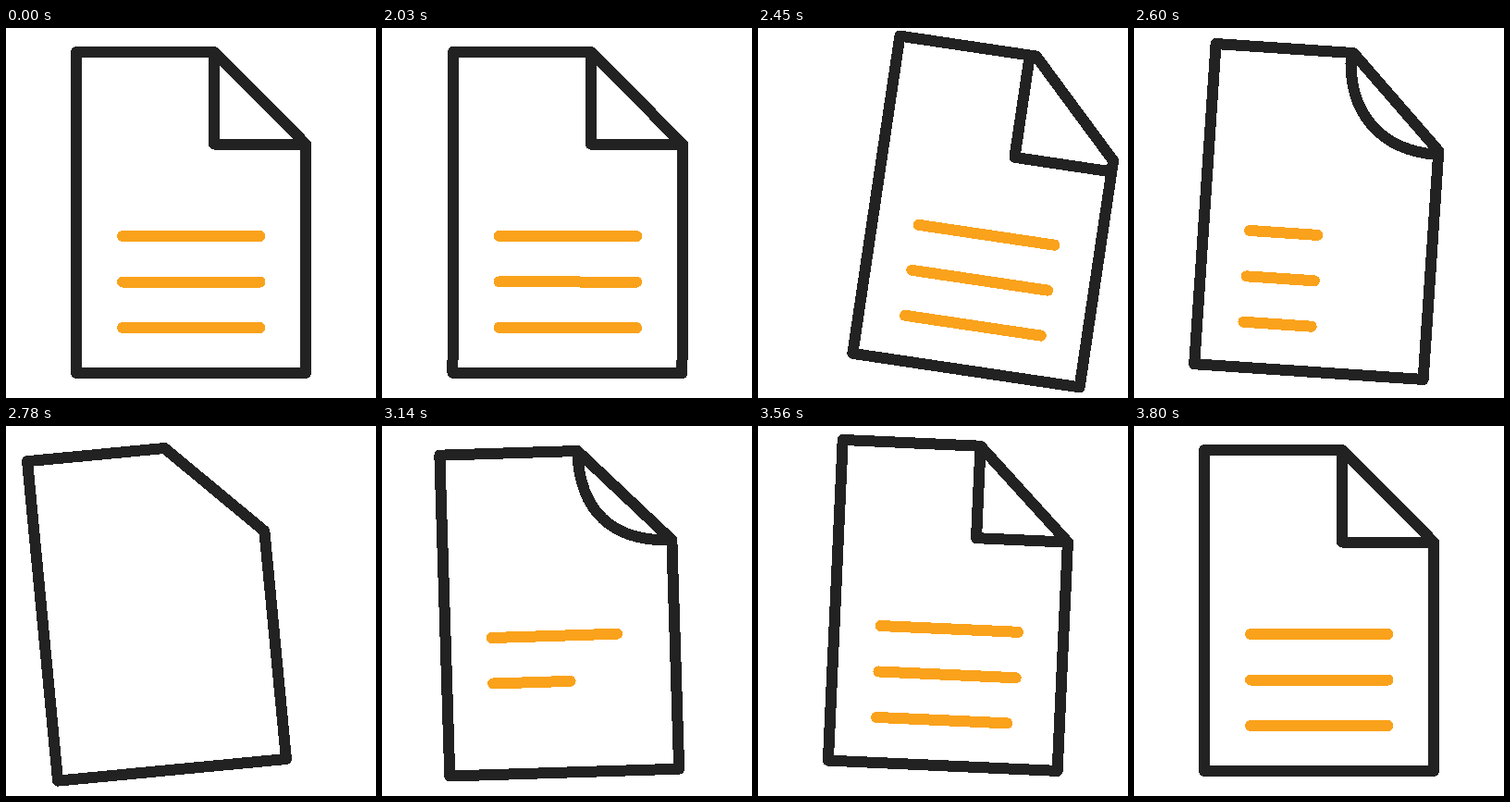
Write an HTML page that moves like this. It is 400x400 px and loops after 3830 ms.

```html
<!DOCTYPE html>
<html lang="en">
<head>
<meta charset="utf-8">
<title>Document icon</title>
<style>
  html, body { margin: 0; height: 100%; overflow: hidden; background: #fff; }
  svg { display: block; width: 100%; height: 100%; shape-rendering: crispEdges; }
  path { fill: none; stroke: #222; stroke-width: 12; stroke-linecap: round; stroke-linejoin: round; }
  .line { stroke: #faa21b; }
</style>
</head>
<body>
<svg viewBox="0 0 400 400">
  <g id="page">
    <path d="M76 26H225L324 125.5V373H76Z"/>
    <path id="fold"/>
    <path class="line"/>
    <path class="line"/>
    <path class="line"/>
  </g>
</svg>
<script>
const LOOP = 3830;
const page = document.getElementById('page');
const fold = document.getElementById('fold');
const lines = document.querySelectorAll('.line');

const progress = (t, from, to) => Math.min(1, Math.max(0, (t - from) / (to - from)));

// The folded corner bulges out of the diagonal until it becomes square.
function foldPath(open, slide) {
  const x = 225 - 7 * slide, y = 125.5 + 12 * slide;
  const c1 = [x, 26 + (y - 26) * open];
  const c2 = [324 + (x - 324) * open, y];
  const mid = [(c1[0] + c2[0]) / 2, (c1[1] + c2[1]) / 2];
  return `M${x} 26Q${c1} ${mid}Q${c2} 324 ${y}`;
}

function draw(t) {
  const ease = (from, to) => (1 - Math.cos(Math.PI * progress(t, from, to))) / 2;

  // The page swings right, left, right again and settles; the tilt trails the sway.
  const sway = 55 * ease(2000, 2400) - 92 * ease(2400, 2760) + 51 * ease(2895, 3350) - 14 * ease(3350, 3800);
  const tilt = 8.5 * ease(2000, 2436) - 16.5 * ease(2436, 2900) + 12.3 * ease(2900, 3380) - 4.3 * ease(3380, 3800);
  const lift = 3.5 * ease(2700, 3000) - ease(2000, 2400) - 10.5 * ease(3080, 3420) + 8 * ease(3420, 3800);
  page.setAttribute('transform', `translate(${sway} ${lift}) rotate(${tilt} 200 199.5)`);

  const open = 1 - ease(2450, 2740) + ease(2790, 3500);
  const slide = ease(2000, 2450) - ease(2450, 2700);
  fold.setAttribute('d', foldPath(open, slide));

  // The lines shrink together, then grow back one after another.
  lines.forEach((line, i) => {
    const start = 2775 + 190 * i;
    const grown = 1 - (1 - progress(t, start, start + 520)) ** 2;
    const size = 1 - ease(2460, 2740) + grown;
    line.setAttribute('d', size > 0.03 ? `M126 ${225 + 49.5 * i}h${148.5 * size}` : '');
  });
}

const start = performance.now();
function tick() {
  draw((performance.now() - start) % LOOP);
  requestAnimationFrame(tick);
}
tick();
</script>
</body>
</html>
```
